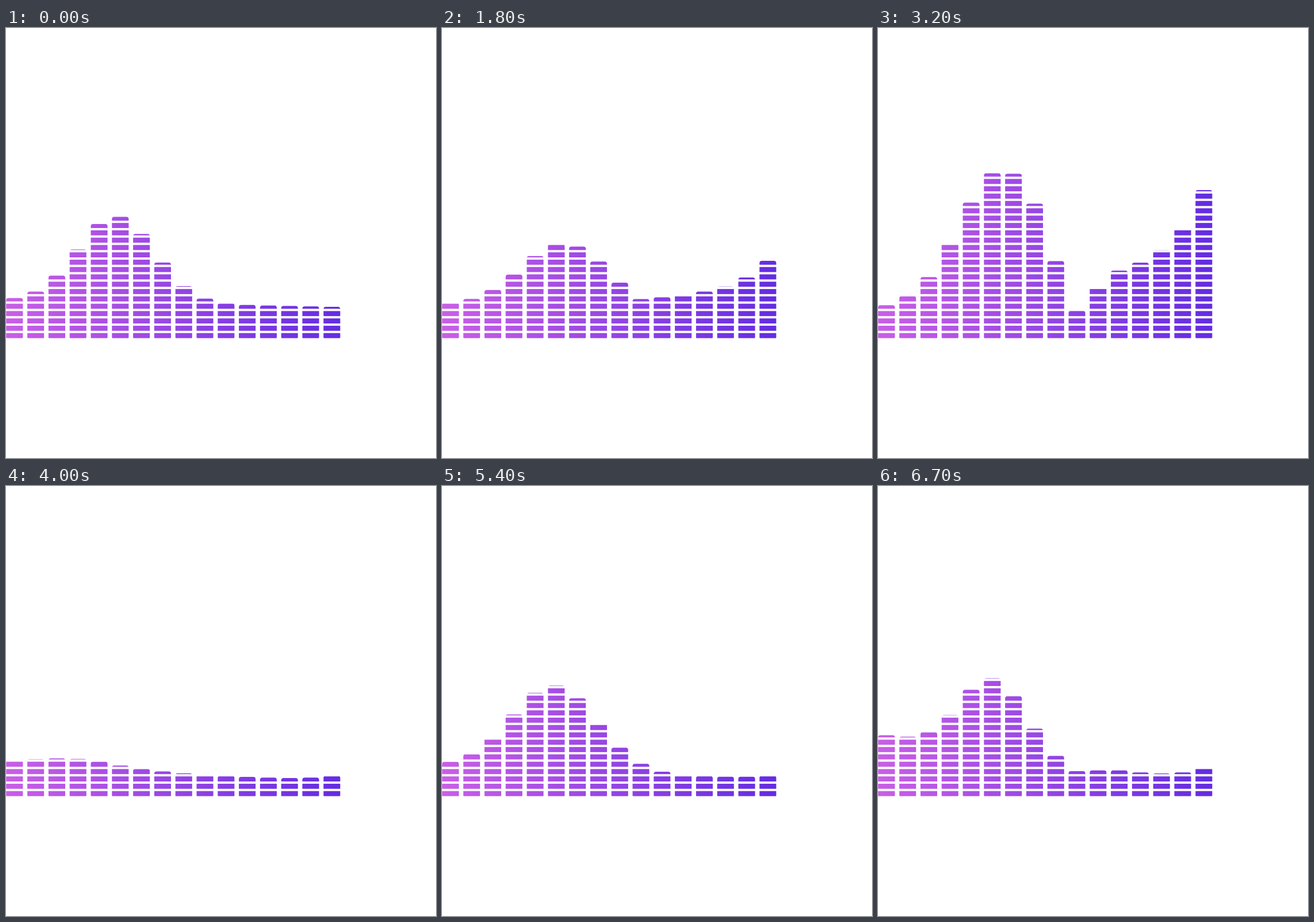
Recreate the animation shown at these times as an HTML page. Size 748x748 px, loop 6730 ms.

```html
<!DOCTYPE html>
<html lang="en">
<head>
<meta charset="utf-8">
<title>Equalizer</title>
<style>
  html, body { margin: 0; width: 100%; height: 100%; overflow: hidden; background: #fff; }
  svg { display: block; width: 100%; height: 100%; }
</style>
</head>
<body>
<svg viewBox="0 0 748 748">
  <defs>
    <linearGradient id="tint" gradientUnits="userSpaceOnUse" x1="0" y1="0" x2="581" y2="0">
      <stop offset="0" stop-color="#c95fe6"/>
      <stop offset="1" stop-color="#632ce2"/>
    </linearGradient>
    <clipPath id="bars"></clipPath>
  </defs>
  <g id="rows" clip-path="url(#bars)" fill="url(#tint)"></g>
</svg>
<script>
const LOOP = 6730, BASE = 540, BAR_COUNT = 16, BAR_PITCH = 36.8, BAR_WIDTH = 29.1;
const ROW_COUNT = 28, ROW_PITCH = 12.77, ROW_HEIGHT = 8.8;
const ATTACK = 80, DECAY = 280;

// A spectrum is a sloping floor with a hump, a notch and a rising right end
const moods = [
  { time: 0,    left: 66, right: 55,  hump: 150, center: 4.8, width: 1.8, notch: 0,  rise: 0 },
  { time: 720,  left: 50, right: 28,  hump: 26,  center: 2,   width: 1.6, notch: 0,  rise: 2 },
  { time: 1800, left: 60, right: 75,  hump: 100, center: 5.3, width: 1.9, notch: 17, rise: 60 },
  { time: 3200, left: 54, right: 125, hump: 214, center: 5.4, width: 1.9, notch: 88, rise: 133 },
  { time: 4000, left: 58, right: 24,  hump: 14,  center: 2.8, width: 1.9, notch: 0,  rise: 12 },
  { time: 5400, left: 53, right: 29,  hump: 148, center: 4.9, width: 2,   notch: 0,  rise: 7 },
  { time: 6680, left: 106, right: 20, hump: 128, center: 5,   width: 1.5, notch: 15, rise: 30 }
];

// Extra kicks of the hump: time and strength
const beats = [
  [80, 33], [1000, 235], [1520, 147], [2440, 65], [2920, 53],
  [3700, 134], [4280, 260], [5120, 113], [5960, 81], [6400, 14]
];

const mix = (a, b, u) => a + (b - a) * u;
const bell = (distance, width) => Math.exp(-0.5 * (distance / width) ** 2);

function addRect(parent, attrs) {
  const rect = document.createElementNS('http://www.w3.org/2000/svg', 'rect');
  for (const name in attrs) rect.setAttribute(name, attrs[name]);
  return parent.appendChild(rect);
}

const rows = document.getElementById('rows');
for (let i = 0; i < ROW_COUNT; i++) {
  addRect(rows, { x: 0, y: 530.7 - i * ROW_PITCH, width: 582, height: ROW_HEIGHT });
}
const clip = document.getElementById('bars');
const bars = Array.from({ length: BAR_COUNT }, (_, i) =>
  addRect(clip, { x: i * BAR_PITCH + 0.3, width: BAR_WIDTH, rx: 4 }));

// Five poses are shown per 200 ms, the first one held longer
function poseTime(t) {
  const step = [70, 100, 130, 170].filter(edge => t % 200 >= edge).length;
  return Math.floor(t / 200) * 200 + step * 40;
}

function moodAt(time) {
  const next = Math.max(1, moods.findIndex(mood => mood.time >= time));
  const from = moods[next - 1], to = moods[next];
  const u = (time - from.time) / (to.time - from.time);
  const mood = {};
  for (const name in from) mood[name] = mix(from[name], to[name], u);
  return mood;
}

function kickAt(time) {
  return beats.reduce((sum, [beat, strength]) => {
    const d = time - beat;
    const level = Math.max(0, d < 0 ? 1 + d / ATTACK : 1 - d / DECAY);
    return sum + strength * level ** 1.5;
  }, 0);
}

function barHeight(i, mood, kick) {
  const rise = Math.exp((i - BAR_COUNT + 1) / 1.6);
  return mix(mood.left, mood.right, i / (BAR_COUNT - 1))
    + mood.hump * bell(i - mood.center, mood.width)
    - mood.notch * bell(i - 8.9, 0.75)
    + mood.rise * rise
    + kick * (bell(i - 5, 1.9) + 0.3 * rise);
}

function render(t) {
  const time = poseTime(t), mood = moodAt(time), kick = kickAt(time);
  bars.forEach((bar, i) => {
    const height = barHeight(i, mood, kick);
    bar.setAttribute('y', BASE - height);
    bar.setAttribute('height', height + 1.5);
  });
}

const start = performance.now();
function tick() {
  render((performance.now() - start) % LOOP);
  requestAnimationFrame(tick);
}
tick();
</script>
</body>
</html>
```
